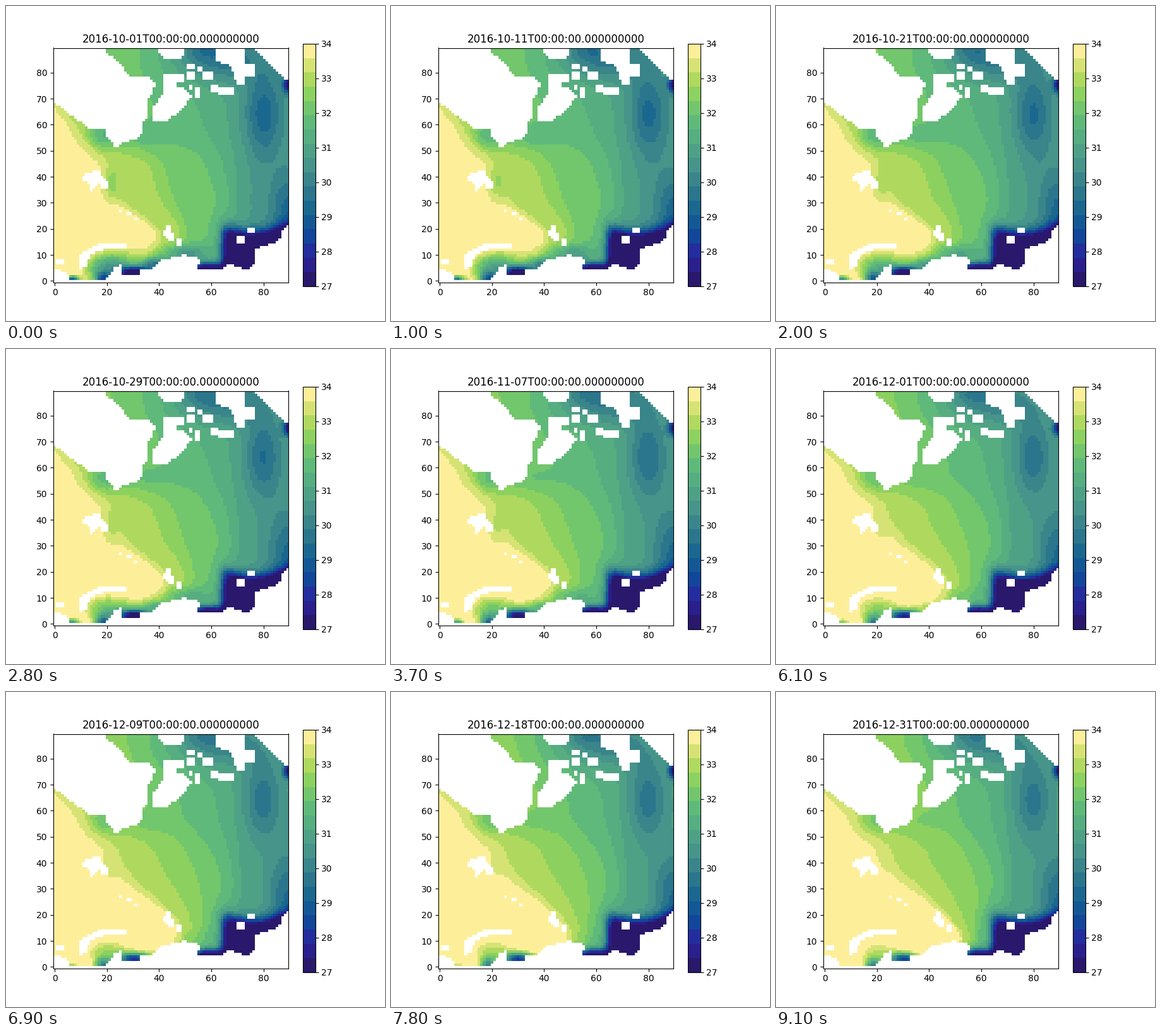
A matplotlib script that plays this animation: 600x500 px, repeating every 9.2 s.

```python
import numpy as np
import matplotlib.pyplot as plt
from matplotlib.animation import FuncAnimation
from matplotlib.colors import LinearSegmentedColormap
from matplotlib.path import Path

N, DAYS = 90, 92
x, y = np.meshgrid(np.arange(N) + 0.5, np.arange(N) + 0.5)

HALINE = ["#2a186c", "#2a23a0", "#0f4b99", "#176590", "#327c8b", "#46948a",
          "#53a983", "#61bc79", "#85d060", "#bedc5e", "#fdef9a"]

# Two fronts as x over y, each on the first and the last day
ROWS = [0, 12, 18, 25, 32, 40, 48, 57, 67, 90]
SALTY_FRONT = np.array([[30, 37, 41, 33, 21, 19.5, 17.5, 8.5, 0, -10],
                        [45, 54, 48, 41, 31, 21, 19.5, 11.5, 0, -10]])
MID_FRONT = np.array([[58, 58, 59, 61, 62.5, 60, 57, 46, 38, 36],
                      [58, 59, 60.5, 63, 65, 64, 59, 53, 50.5, 41]])
EAST_LINE = 72

# Salinity by position: 0 at the salty front, 1 at the mid front, 2 in the east
LEVELS = [35, 33.6, 33.15, 32.76, 32.35, 31.94, 31.53, 31.12, 30.7]
POSITIONS = np.array([[-1, 0, 0.1, 0.47, 0.6, 1, 1.5, 1.85, 2.4],
                      [-1, 0, 0.16, 0.48, 0.82, 1, 1.6, 2, 4]])

# Local water masses: x, y, width, height, first and last strength
POOLS = [
    (80, 65, 5, 11, -1.6, -1.35),    # northern gyre
    (90, 28, 5, 10, -1.4, -1.2),     # eastern edge
    (90, 76, 1.5, 2, -4, -4),
    (62, 86, 12, 6, -1.6, -1.3),     # archipelago
    (56, 90, 5, 3, -0.8, -0.8),
    (19, 57, 4, 4, -1.1, -0.7),      # north-west coast
    (30, 56, 10, 4, -0.7, -0.35),
    (22, 38, 2, 4, -0.8, 0),
    (50, 11, 6, 2.5, -1.8, 0),       # southern coast
    (39, 7, 4, 2, -3, 0),
    (21, 6, 7, 4.5, -3.6, -1.8),
    (31, 3.5, 4, 1.8, -7, -6),
    (19, 1, 2, 2, -4, -4),
    (7, 1, 2, 1.2, -6, -1),
    (59, 5, 5, 1.8, -6, -5.5),
]

COASTS = [
    # north-west mainland
    [(-1, 91), (21, 91), (20, 88), (23, 87), (27, 82), (29, 79), (37, 79),
     (39, 76), (38, 73), (36, 70), (36, 63), (34, 62), (34, 58), (32, 55),
     (27, 54), (25, 52), (23, 52), (22, 55), (20, 56), (20, 59), (14, 59),
     (10, 62), (5, 65), (4, 67), (0, 69), (-1, 69)],
    # northern shores
    [(40, 91), (50, 91), (50, 87), (49, 86), (42, 86), (40, 89)],
    [(62, 91), (73, 91), (73, 84), (77, 84), (77, 79), (73, 79), (73, 76),
     (70, 76), (68, 83), (62, 85)],
    [(77, 91), (91, 91), (91, 77), (89, 78), (85, 81), (82, 84), (77, 89)],
    # central block
    [(42, 80), (50, 80), (50, 77), (47, 77), (47, 75), (50, 75), (51, 73),
     (53, 72), (50, 67), (46, 64), (43, 62), (38, 62), (38, 67), (40, 70),
     (42, 73)],
    # inner islands
    [(16, 43), (18, 43), (18, 41), (21, 39), (21, 36), (18, 36), (18, 38),
     (15, 35), (14, 35), (14, 38), (11, 39), (11, 41)],
    [(42, 19), (43, 22), (45, 22), (46, 16), (44, 16)],
    # southern arc
    [(10, 11), (16, 14), (18, 15), (28, 15), (28, 13), (21, 13), (14, 11),
     (13, 6), (10, 5)],
    # southern mainland
    [(-1, 6), (2, 5), (6, 3), (6, 1), (20, 1), (20, 2), (23, 4), (23, 6),
     (26, 7), (26, 3), (33, 3), (33, 5), (37, 5), (42, 9), (48, 10),
     (50, 12), (51, 10), (55, 10), (56, 8), (55, 5), (64, 5), (67, 7),
     (74, 5), (77, 7), (77, 13), (81, 14), (86, 16), (88, 21), (91, 23),
     (91, -1), (-1, -1)],
]

# Small islands: x, y, width, height
ISLETS = [
    (51, 82, 3, 2), (55, 81, 2, 2), (51, 78, 3, 3), (57, 78, 4, 3),
    (52, 74, 1, 2), (54, 71, 2, 4), (60, 73, 3, 3), (63, 72, 6, 3),
    (25, 27, 1, 1), (28, 26, 2, 1), (31, 24, 1, 1), (47, 14, 2, 3),
    (1, 7, 3, 2), (70, 15, 3, 3), (74, 19, 3, 2),
]


def land_mask():
    cells = np.column_stack([x.ravel(), y.ravel()])
    mask = np.zeros((N, N), bool)
    for coast in COASTS:
        inside = Path(coast + coast[:1]).contains_points(cells)
        mask |= inside.reshape(N, N)
    for left, low, width, height in ISLETS:
        mask[low:low + height, left:left + width] = True
    return mask


def blend(pair, p):
    return pair[0] + (pair[1] - pair[0]) * p


def front(pair, p):
    """Smoothed x of a front for every row, as a column."""
    line = np.interp(np.arange(-3, N + 3) + 0.5, ROWS, blend(pair, p))
    return np.convolve(line, np.ones(7) / 7, "valid")[:, None]


def sigmoid(v):
    return 1 / (1 + np.exp(-v))


land = land_mask()


def salinity(day):
    p = day / (DAYS - 1)
    salty, mid = front(SALTY_FRONT, p), front(MID_FRONT, p)
    position = np.where(x < mid, (x - salty) / (mid - salty),
                        1 + (x - mid) / (EAST_LINE - mid))
    field = np.interp(position, blend(POSITIONS, p), LEVELS)
    for cx, cy, width, height, *strength in POOLS:
        reach = ((x - cx) / width) ** 2 + ((y - cy) / height) ** 2
        field += blend(strength, p) * np.exp(-reach / 2)
    shelf = 18.5 - p + 0.02 * (x - 77) ** 2
    field -= 6.5 * sigmoid((x - 65) / 1.1) * sigmoid((shelf - y) / 1.6)
    return np.ma.array(field, mask=land)


def date_label(day):
    return str(np.datetime64("2016-10-01", "ns") + np.timedelta64(day, "D"))


plt.rcParams["text.kerning_factor"] = 6
fig, ax = plt.subplots(figsize=(6, 5), dpi=100)
cmap = LinearSegmentedColormap.from_list("haline17", HALINE, N=17)
image = ax.imshow(salinity(0), origin="lower", cmap=cmap, vmin=27, vmax=34,
                  interpolation="nearest")
fig.colorbar(image)
title = ax.set_title(date_label(0))


def update(day):
    image.set_data(salinity(day))
    title.set_text(date_label(day))
    return image, title


anim = FuncAnimation(fig, update, frames=DAYS, interval=100, repeat=True,
                     repeat_delay=0)
plt.show()
```
